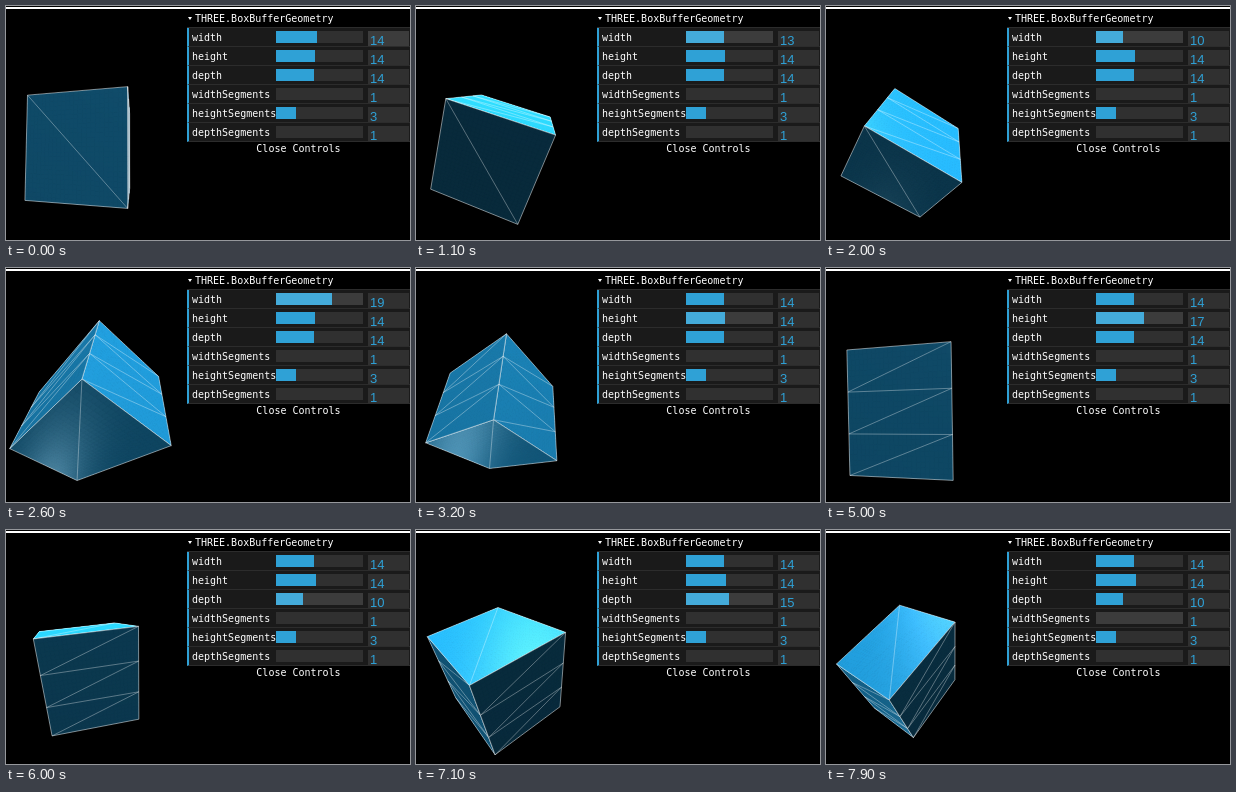
An HTML page with a canvas for the animation above (8 s loop, 404 by 234 pixels).

```html
<!DOCTYPE html>
<html lang="en">
<head>
<meta charset="utf-8">
<title>Box geometry controls</title>
<style>
  html, body { margin: 0; width: 100%; height: 100%; overflow: hidden; background: #000; }
  #stage { position: relative; width: 404px; height: 234px; overflow: hidden; }
  canvas { position: absolute; left: 0; top: 0; }
  #rule { position: absolute; left: 0; top: 1px; width: 404px; height: 2px; background: #fff; }
  #panel { position: absolute; left: 181px; top: 3px; width: 223px; color: #fff;
    font: 10px/19px "DejaVu Sans Mono", "Liberation Mono", monospace; white-space: pre; }
  .title, .row { position: relative; box-sizing: border-box; height: 19px; border-bottom: 1px solid #2c2c2c; }
  .title { padding-left: 8px; background: #000; }
  .title::before { content: ""; position: absolute; left: 1px; top: 8px;
    border: 2px solid transparent; border-top: 3px solid #fff; border-bottom: 0; }
  .row { padding-left: 3px; background: #1a1a1a; border-left: 2px solid #2fa1d6; }
  .track { position: absolute; left: 87px; top: 3px; width: 87px; height: 12px; background: #303030; }
  .fill { height: 100%; background: #2fa1d6; }
  .value { position: absolute; left: 179px; top: 3px; width: 41px; height: 15px; padding-left: 2px;
    box-sizing: border-box; background: #303030; color: #2fa1d6;
    font: 13px/19px "Liberation Sans", Arial, sans-serif; }
  .hot .track, .value.hot { background: #3c3c3c; }
  .hot .fill { background: #44abda; }
  .close { height: 14px; line-height: 14px; text-align: center; background: #000; }
</style>
</head>
<body>
<div id="stage">
  <canvas id="view" width="404" height="234"></canvas>
  <div id="rule"></div>
  <div id="panel"><div class="title">THREE.BoxBufferGeometry</div></div>
</div>
<script>
const LOOP = 8000, STEP = 100;
const ctx = document.getElementById('view').getContext('2d');
const panel = document.getElementById('panel');

// Slider values over time: [ms, value], linear in between
const tracks = {
  width: [[0, 14.55], [900, 14.45], [1900, 10], [2000, 10], [2400, 24], [2850, 13.66]],
  height: [[0, 14], [3700, 14], [4500, 21], [4700, 24], [5000, 17], [5400, 14.33]],
  depth: [[0, 13.66], [5600, 13.66], [5900, 10], [6100, 10], [6700, 21], [7100, 15.33], [7500, 10]],
  widthSegments: [[0, 1]],
  heightSegments: [[0, 3]],
  depthSegments: [[0, 1]]
};
const hovers = [[500, 'width'], [3000, 'height'], [5500, 'depth'], [7600, 'widthSegments']];

function valueAt(keys, t) {
  const next = keys.findIndex(k => k[0] > t);
  if (next < 0) return keys[keys.length - 1][1];
  const [t0, v0] = keys[next - 1], [t1, v1] = keys[next];
  return v0 + (v1 - v0) * (t - t0) / (t1 - t0);
}

function add(cls, parent, text = '') {
  const el = document.createElement('div');
  el.className = cls;
  el.textContent = text;
  return parent.appendChild(el);
}

const rows = Object.keys(tracks).map(name => {
  const row = add('row', panel, name);
  const fill = add('fill', add('track', row));
  return { name, row, fill, max: name.endsWith('Segments') ? 10 : 30, value: add('value', row) };
});
add('close', panel, 'Close Controls');

// Vector helpers
const dot = (a, b) => a[0] * b[0] + a[1] * b[1] + a[2] * b[2];
const sub = (a, b) => a.map((v, i) => v - b[i]);
const sum = (a, b) => a.map((v, i) => v + b[i]);
const unit = a => { const l = Math.hypot(...a); return a.map(v => v / l); };
function rotX([x, y, z], a) {
  const c = Math.cos(a), s = Math.sin(a);
  return [x, y * c - z * s, y * s + z * c];
}
function rotY([x, y, z], a) {
  const c = Math.cos(a), s = Math.sin(a);
  return [x * c + z * s, y, z * c - x * s];
}

// Orbiting camera
const AZIMUTH = 0.25, TILT = -0.06, DIST = 30, FOCAL = 180.5, CX = 80.7, CY = 143.3;
const eye = rotY(rotX([0, 0, DIST], -TILT), AZIMUTH);
function project(p) {
  const [x, y, z] = rotX(rotY(p, -AZIMUTH), TILT);
  const k = FOCAL / (DIST - z);
  return [CX + x * k, CY - y * k];
}

// Phong material under three point lights
const lights = [[0, 200, 0], [100, 200, 100], [-100, -200, -100]];
const emissive = [7, 37, 52], diffuse = [21, 98, 137], SPECULAR = 17 / 255;
function shade(p, n) {
  const toEye = unit(sub(eye, p));
  let lit = 0, gloss = 0;
  for (const light of lights) {
    const l = unit(sub(light, p)), nl = dot(n, l);
    if (nl <= 0) continue;
    const h = unit(sum(l, toEye)), lh = dot(l, h);
    const fresnel = SPECULAR + (1 - SPECULAR) * 2 ** ((-5.55473 * lh - 6.98316) * lh);
    lit += nl;
    gloss += nl * fresnel * 4 * Math.max(dot(n, h), 0) ** 30;
  }
  const rgb = emissive.map((e, i) => Math.min(255, Math.round(e + diffuse[i] * lit + 255 * gloss)));
  return `rgb(${rgb})`;
}

// Faces: u axis, v axis, normal axis, u sign, v sign, normal sign
const faces = [
  [2, 1, 0, -1, -1, 1], [2, 1, 0, 1, -1, -1],
  [0, 2, 1, 1, 1, 1], [0, 2, 1, 1, -1, -1],
  [0, 1, 2, 1, -1, 1], [0, 1, 2, -1, -1, -1]
];

function trace(points) {
  ctx.beginPath();
  points.forEach(p => ctx.lineTo(...p));
}

function drawFace([u, v, w, us, vs, ws], size, segs, spin) {
  const normal = [0, 0, 0];
  normal[w] = ws;
  const n = spin(normal);
  const at = (a, b) => {
    const p = [];
    p[u] = (a - 0.5) * size[u] * us;
    p[v] = (b - 0.5) * size[v] * vs;
    p[w] = size[w] / 2 * ws;
    return spin(p);
  };
  if (dot(n, sub(eye, at(0.5, 0.5))) <= 0) return;

  const px = (a, b) => project(at(a, b));
  const quad = (a, b, da, db) => [px(a, b), px(a + da, b), px(a + da, b + db), px(a, b + db)];
  const outline = quad(0, 0, 1, 1);

  ctx.save();
  trace(outline);
  ctx.clip();
  const N = 24, d = 1 / N;
  ctx.lineWidth = 1;
  for (let i = 0; i < N; i++) for (let j = 0; j < N; j++) {
    ctx.fillStyle = ctx.strokeStyle = shade(at((i + 0.5) * d, (j + 0.5) * d), n);
    trace(quad(i * d, j * d, d, d));
    ctx.closePath();
    ctx.fill();
    ctx.stroke();
  }
  ctx.restore();

  const line = (a, b) => { trace([a, b]); ctx.stroke(); };
  const su = segs[u], sv = segs[v];
  ctx.lineJoin = 'round';
  ctx.lineWidth = 1;
  ctx.strokeStyle = 'rgba(255,255,255,.33)';
  for (let j = 0; j < sv; j++) {
    if (j) line(px(0, j / sv), px(1, j / sv));
    for (let i = 0; i < su; i++) line(px(i / su, (j + 1) / sv), px((i + 1) / su, j / sv));
  }
  for (let i = 1; i < su; i++) line(px(i / su, 0), px(i / su, 1));
  ctx.strokeStyle = 'rgba(255,255,255,.48)';
  trace(outline);
  ctx.closePath();
  ctx.stroke();
}

function render(t) {
  const now = {};
  const hover = hovers.filter(h => h[0] <= t).pop();
  for (const { name, row, fill, max, value } of rows) {
    const v = now[name] = valueAt(tracks[name], t);
    fill.style.width = Math.ceil((v - 1) / (max - 1) * 87) + 'px';
    value.textContent = Math.min(Math.round(v), Math.floor(v + 0.4));
    row.classList.toggle('hot', !!hover && hover[1] === name);
  }
  rows[0].value.classList.toggle('hot', t < 500);

  const angle = -1.557 + 0.327 * t / 1000;
  const spin = p => rotX(rotY(p, angle), angle);
  const size = [now.width, now.height, now.depth];
  const segs = [now.widthSegments, now.heightSegments, now.depthSegments];
  ctx.clearRect(0, 0, 404, 234);
  faces.forEach(f => drawFace(f, size, segs, spin));
}

const start = performance.now();
let shown = -1;
function tick() {
  const t = Math.floor((performance.now() - start) % LOOP / STEP) * STEP;
  if (t !== shown) render(shown = t);
  requestAnimationFrame(tick);
}
tick();
</script>
</body>
</html>
```
